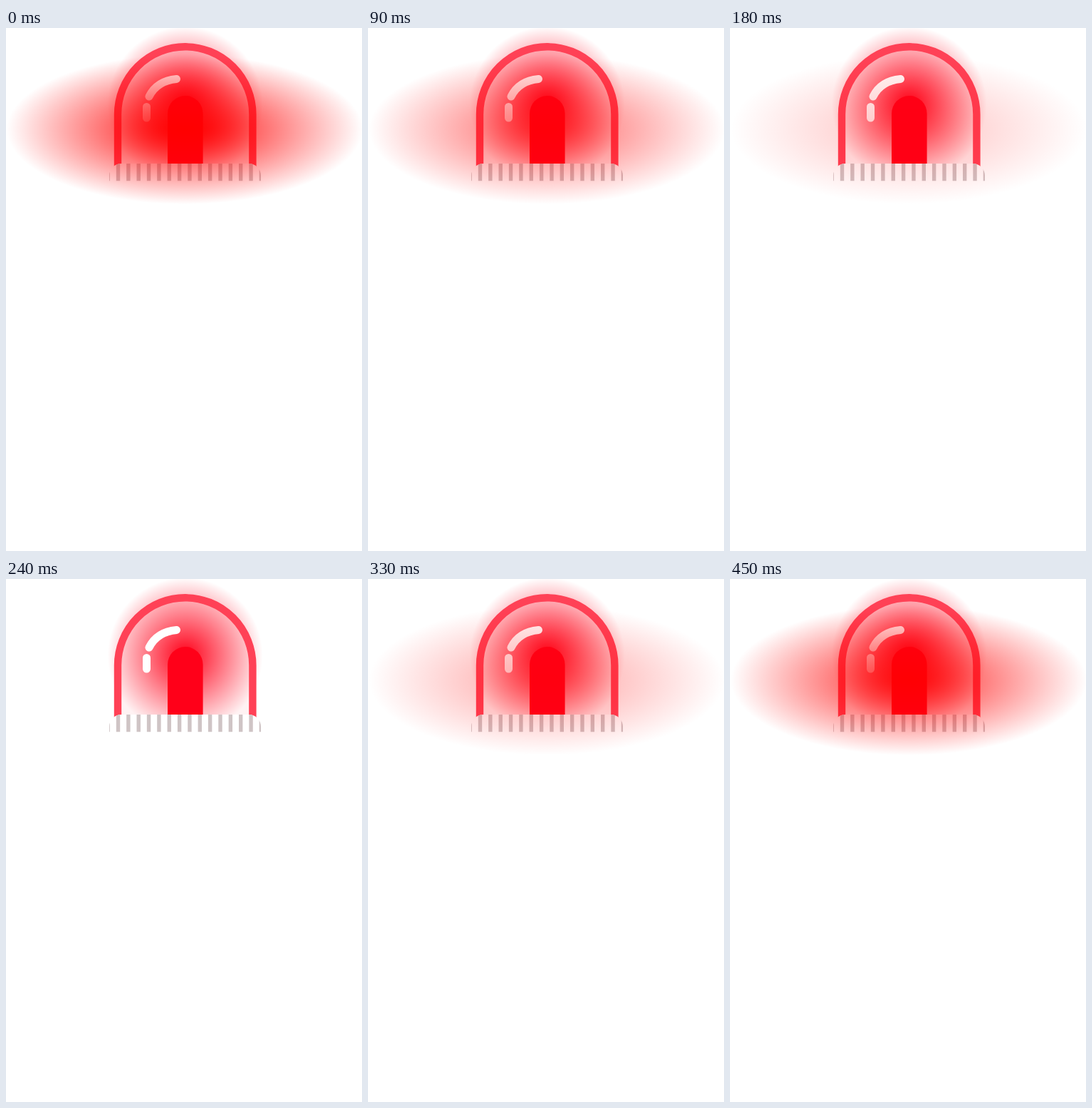
An HTML page that plays this animation: 500x733 px, repeating every 0.48 s.

```html
<!DOCTYPE html>
<html lang="en">
<head>
<meta charset="utf-8">
<title>Warning light</title>
<style>
html, body { margin: 0; width: 100%; height: 100%; overflow: hidden; background: #fff; }
svg { display: block; width: 500px; height: 733px; }
</style>
</head>
<body>
<svg viewBox="0 0 500 733">
  <defs>
    <radialGradient id="halo">
      <stop offset="0" stop-color="#ff0019"/>
      <stop offset="1" stop-color="#ff0019" stop-opacity="0"/>
    </radialGradient>
    <radialGradient id="beam">
      <stop offset="0" stop-color="#f00"/>
      <stop offset="1" stop-color="#f00" stop-opacity="0"/>
    </radialGradient>
    <clipPath id="baseClip">
      <path d="M145 214.5V207A17 17 0 0 1 162 190H341A17 17 0 0 1 358 207V214.5Z"/>
    </clipPath>
  </defs>
  <path d="M157 200V121A94.7 94.7 0 0 1 346.4 121V200Z" fill="#ff0019" fill-opacity=".05"/>
  <circle cx="251.7" cy="107" r="109" fill="url(#halo)"/>
  <path d="M157 200V121A94.7 94.7 0 0 1 346.4 121V200" fill="none" stroke="#ff4156" stroke-width="10.4"/>
  <path d="M227 195V120A24.8 25 0 0 1 276.6 120V195Z" fill="#ff0019"/>
  <g fill="none" stroke="#fff" stroke-width="11" stroke-linecap="round">
    <path d="M201 96Q212 74 239.5 71.5"/>
    <path d="M197.5 110.5V126"/>
  </g>
  <g clip-path="url(#baseClip)">
    <rect x="140" y="190" width="222" height="25" fill="#fff"/>
    <g id="ribs" fill="#cfc4c5"></g>
  </g>
  <rect x="100" y="214.5" width="300" height="40" fill="#fff"/>
  <ellipse id="flash" cx="251" cy="142" rx="250" ry="105" fill="url(#beam)"/>
</svg>
<script>
const LOOP = 480, STEP = 30;
const ribs = document.getElementById('ribs');
const flash = document.getElementById('flash');

for (let i = -1; i < 15; i++) {
  const rib = document.createElementNS('http://www.w3.org/2000/svg', 'rect');
  rib.setAttribute('x', 154.8 + i * 14.35);
  rib.setAttribute('y', 190);
  rib.setAttribute('width', 5.4);
  rib.setAttribute('height', 25);
  ribs.append(rib);
}

// The beam fades out and back in, in even steps.
function draw(ms) {
  const t = Math.floor((ms % LOOP) / STEP) * STEP;
  flash.setAttribute('opacity', Math.abs(1 - 2 * t / LOOP));
}

const start = performance.now();
function tick() {
  draw(performance.now() - start);
  requestAnimationFrame(tick);
}
draw(0);
requestAnimationFrame(tick);
</script>
</body>
</html>
```
